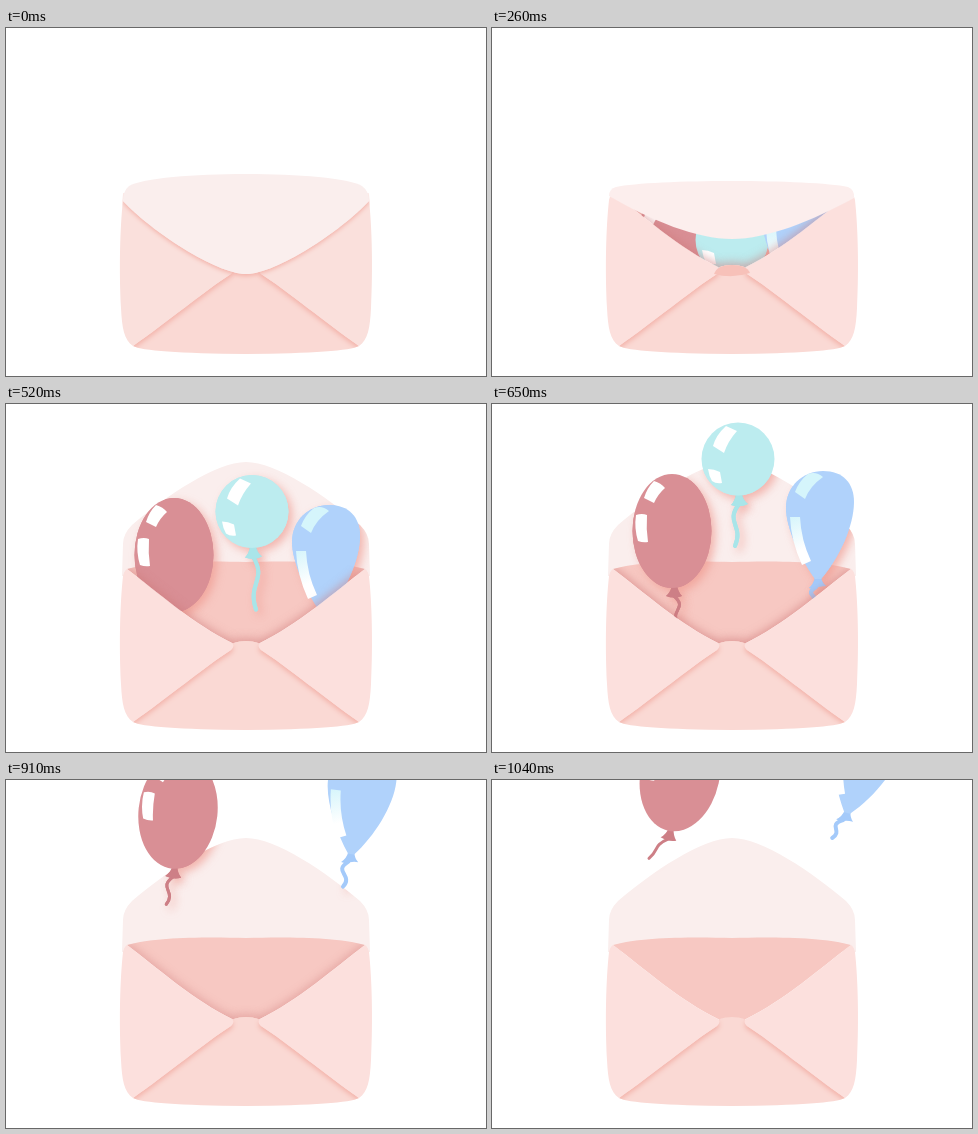
An HTML page with a canvas for the animation above (1.17 s loop, 480 px wide and 348 px high).

```html
<!DOCTYPE html>
<html lang="en">
<head>
<meta charset="utf-8">
<title>Envelope with balloons</title>
<style>
html, body { margin: 0; width: 100%; height: 100%; overflow: hidden; background: #fff; }
canvas { display: block; }
</style>
</head>
<body>
<canvas id="stage" width="480" height="348"></canvas>
<script>
const ctx = document.getElementById('stage').getContext('2d');
const shape = d => new Path2D(d);
const STEP = 130, LOOP = 1170;

// Envelope parts; the right panel mirrors the left one.
const panel = shape('M121 165C150 187 190 222 226 239Q229 242 225 246C200 262 160 295 127 318C118 312 116 300 115 280C113 240 114 200 117 172Q118 167 121 165Z');
const panels = new Path2D(panel);
panels.addPath(panel, new DOMMatrix([-1, 0, 0, 1, 480, 0]));
const base = shape('M127 318C158 292 198 259 222 244Q226 237 240 237Q254 237 258 244C282 259 322 292 353 318Q340 325 240 326Q140 325 127 318Z');
const mouth = shape('M121 165C150 157 200 157 240 158C280 157 330 157 359 165C330 187 290 222 254 239L240 250L226 239C190 222 150 187 121 165Z');
const body = shape('M117 165H363C366 200 367 240 365 280C364 300 362 312 353 318Q340 325 240 326Q140 325 127 318C118 312 116 300 115 280C113 240 114 200 117 165Z');
const tab = shape('M222 246Q225 237 240 237Q255 237 258 245Q240 251 222 246Z');

const flaps = {
  closed: shape('M117 173Q117 163 123 158C150 142 330 142 356 158Q363 163 363 173C335 203 270 246 240 246C210 246 145 203 117 173Z'),
  lifted: shape('M117 168Q117 161 124 159C160 151 320 151 356 159Q363 162 362 170C320 193 275 211 240 211C205 211 160 193 117 168Z'),
  half: shape('M116 172L117 158Q118 148 128 141C165 115 210 97 240 97C270 97 315 115 352 141Q362 148 363 158L364 172Z'),
  open: shape('M116 172L117 140Q117 130 126 121C160 92 210 58 240 58C270 58 320 92 354 121Q363 130 363 140L364 172Z')
};

// Balloons around their own centre; tie is where the string starts.
const red = {
  fill: '#d98f95', line: '#cd7f86', tie: [2, 65], width: 3,
  skin: shape('M39.5 0A39.5 57 0 1 1 -39.5 0A39.5 57 0 1 1 39.5 0Z'),
  knot: shape('M0 54L5 54Q6 61 10 65Q2 68 -6 65Q-1 61 0 54Z'),
  shine: shape('M-18 -50Q-11 -48 -7 -43Q-14 -37 -18 -28L-28 -33Q-25 -43 -18 -50ZM-36 -16Q-30 -18 -25 -16Q-26 -2 -24 11Q-29 12 -34 10Q-38 -3 -36 -16Z')
};
const teal = {
  fill: '#bcecef', line: '#a9e5e9', tie: [1, 45], width: 4,
  skin: shape('M36.5 0A36.5 36.5 0 1 1 -36.5 0A36.5 36.5 0 1 1 36.5 0Z'),
  knot: shape('M-2 35L4 35Q5 41 10 45Q2 49 -7 46Q-3 42 -2 35Z'),
  shine: shape('M-12 -33L-1 -28Q-10 -18 -14 -6L-25 -13Q-22 -24 -12 -33ZM-30 10Q-24 10 -18 13L-16 24Q-22 25 -26 22Q-29 17 -30 10Z')
};
const blue = {
  fill: '#b0d2fb', line: '#a4cafa', tie: [-4, 81], width: 4,
  skin: shape('M-5 73C-20 52 -34 22 -34 2C-34 -20 -17 -35 3 -35C23 -35 34 -23 34 -4C34 20 19 52 1 73Z'),
  knot: shape('M-5 71L1 71Q2 77 6 80Q-2 80 -5 83L-11 82Q-6 78 -5 71Z'),
  shine: shape('M-12 -32Q-4 -35 3 -29Q-10 -20 -15 -7L-25 -14Q-21 -25 -12 -32ZM-30 11L-20 11Q-19 34 -9 55L-18 59Q-29 35 -30 11Z')
};

// Each balloon: x, y, tilt in degrees, string end relative to the tie.
const poses = [
  { flap: 'closed' },
  { flap: 'lifted', shade: .5, red: [179, 225, 0, 4, 22], teal: [240, 212, 0, 3, 50], blue: [304, 190, 0, 0, 25] },
  { flap: 'half', shade: .5, red: [173, 188, 0, 4, 25], teal: [243, 160, 0, 3, 52], blue: [312, 163, 0, 0, 25] },
  { flap: 'open', shade: .5, red: [168, 151, 0, 4, 28], teal: [246, 107.5, 0, 3, 53], blue: [320, 136, 0, 0, 25] },
  { flap: 'open', shade: .55, red: [180, 127, 0, 4, 28], teal: [246, 55, 0, -4, 42], blue: [328, 102, 0, -1, 20] },
  { flap: 'open', shade: .9, red: [158, 67, 0, 5, 31], teal: [263, -23, 0, -4, 43], blue: [338, 40, 0, 2, 29] },
  { flap: 'open', shade: .4, red: [172, 32, 6, -4, 28], teal: [272, -100, 5, -4, 43], blue: [356, 2, 7, -2, 25] },
  { flap: 'open', shade: 0, red: [188, -5, 12, -15, 23], teal: [280, -180, 5, -4, 43], blue: [376, -37, 15, -6, 20] }
];

function fill(path, color) {
  ctx.fillStyle = color;
  ctx.fill(path);
}

// Draws with a soft shadow that only falls inside a region.
function cast(region, color, dx, dy, blur, draw) {
  ctx.save();
  ctx.clip(region);
  ctx.shadowColor = color;
  ctx.shadowOffsetX = dx;
  ctx.shadowOffsetY = dy;
  ctx.shadowBlur = blur;
  draw();
  ctx.restore();
}

function balloon(kind, [x, y, tilt, ex, ey], shiny) {
  const [tx, ty] = kind.tie, bend = ex < 0 ? -9 : 9;
  ctx.save();
  ctx.translate(x, y);
  ctx.rotate(tilt * Math.PI / 180);
  ctx.beginPath();
  ctx.moveTo(tx, ty);
  ctx.bezierCurveTo(tx + bend * 1.6, ty + ey * .45, tx - bend + ex, ty + ey * .5, tx + ex, ty + ey);
  ctx.lineWidth = kind.width;
  ctx.lineCap = 'round';
  ctx.strokeStyle = kind.line;
  ctx.stroke();
  fill(kind.knot, kind.line);
  fill(kind.skin, kind.fill);
  if (shiny) {
    const glow = ctx.createLinearGradient(-30, 10, -12, 58);
    glow.addColorStop(0, kind === blue ? '#d5f5fb' : '#fff');
    glow.addColorStop(.7, '#fff');
    fill(kind.shine, glow);
  }
  ctx.restore();
}

function balloons(pose, shiny) {
  balloon(red, pose.red, shiny);
  balloon(teal, pose.teal, shiny);
  balloon(blue, pose.blue, shiny);
}

function draw(pose) {
  const flap = flaps[pose.flap];
  const front = pose.flap === 'closed' || pose.flap === 'lifted';
  ctx.clearRect(0, 0, 480, 348);

  if (!front) fill(flap, '#faeeed');
  fill(mouth, '#f7c8c2');
  if (pose.red) {
    const back = new Path2D(mouth);
    if (!front) back.addPath(flap);
    cast(back, 'rgba(238,150,140,.65)', 4, 4, 9, () => balloons(pose));
    balloons(pose, true);
    if (pose.shade) {
      cast(mouth, `rgba(205,120,120,${pose.shade})`, 0, -3, 8, () => {
        fill(panels, '#fce0dd');
        fill(base, '#fad9d4');
      });
    }
  }

  fill(base, '#fad9d4');
  cast(base, '#f3b3aa', 0, 3, 5, () => fill(panels, '#fce0dd'));
  fill(panels, pose.flap === 'closed' ? '#fae0dc' : '#fce0dd');
  if (pose.flap === 'lifted') fill(tab, '#f7c1b9');
  if (front) {
    if (pose.flap === 'closed') cast(body, '#f3b3aa', 0, 2, 4, () => fill(flap, '#faeeed'));
    fill(flap, pose.flap === 'closed' ? '#faeeed' : '#fceeed');
  }
}

function tick() {
  const slot = Math.floor(performance.now() % LOOP / STEP);
  draw(poses[Math.max(0, slot - 1)]);
  requestAnimationFrame(tick);
}
tick();
</script>
</body>
</html>
```
